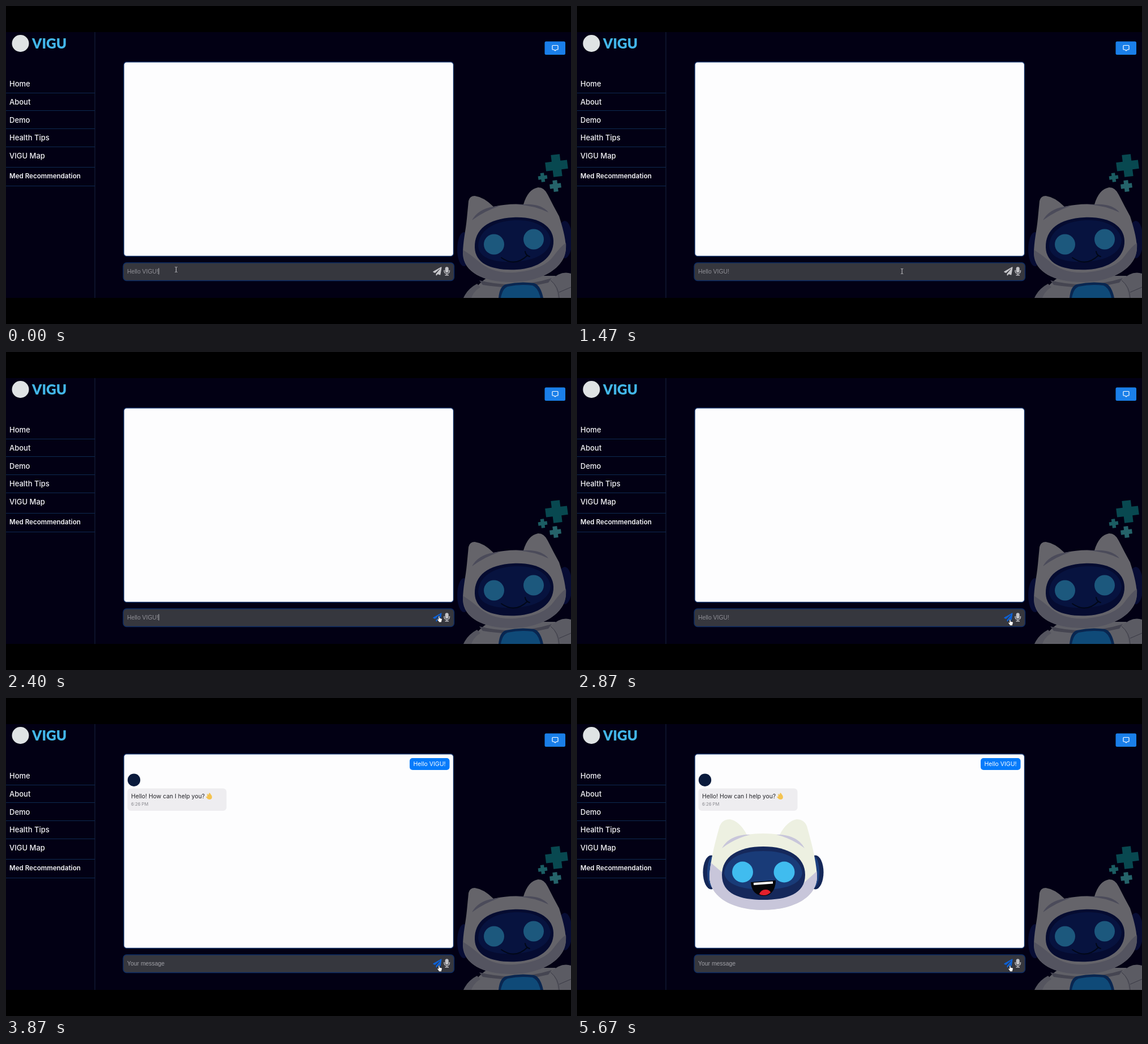
An HTML page that plays this animation: 998 px wide and 561 px high, repeating every 5740 ms.

```html
<!DOCTYPE html>
<html lang="en">
<head>
<meta charset="utf-8">
<title>Chat demo</title>
<style>
  html, body { margin: 0; height: 100%; overflow: hidden; background: #000; }
  svg { display: block; width: 998px; height: 561px; }
  text { font-family: Inter, sans-serif; }
  .nav text { font-size: 13px; font-weight: 500; fill: #f4f4f6; }
  .nav path { stroke: #0d2a50; fill: none; }
  .input text { font: 10.4px "Liberation Sans", Arial, sans-serif; fill: #909097; }
</style>
</head>
<body>
<svg viewBox="0 0 998 561">
  <defs>
    <path id="plus" d="M-.2-.5H.2V-.2H.5V.2H.2V.5H-.2V.2H-.5V-.2H-.2Z"/>
    <clipPath id="page"><path d="M0 46H998V515H0Z"/></clipPath>
    <clipPath id="helmet"><use href="#helmetShape"/></clipPath>
  </defs>

  <path d="M0 46H998V515H0Z" fill="#020014"/>

  <!-- Dimmed mascot -->
  <g clip-path="url(#page)">
    <g fill="#084850">
      <use href="#plus" transform="translate(972.5 281.5) rotate(-7) scale(39)"/>
      <use href="#plus" transform="translate(948 302.500) rotate(-8) scale(16)" fill="#1b5d63"/>
      <use href="#plus" transform="translate(970.5 317.500) rotate(-7) scale(20)" fill="#25636a"/>
    </g>
    <path d="M820 515C826 500 838 485 856 476H970C985 484 994 500 998 515Z" fill="#606067"/>
    <path d="M808 515Q815 499 832 490L838 496Q826 503 822 515Z" fill="#55555f"/>
    <path d="M962 484Q980 466 998 472V515H974Q974 495 962 484Z" fill="#5b5b63"/>
    <path d="M962 484Q976 495 977 515M977 505L998 496" stroke="#393944" fill="none"/>
    <path d="M836 484Q900 500 964 480L958 488Q900 502 842 492Z" fill="#454551"/>
    <path d="M870 515Q872 494 883 491Q908 485 933 489Q944 492 949 515Z" fill="#092650"/>
    <path d="M874 515Q877 498 886 495Q908 490 930 493Q940 497 944 515Z" fill="#0f4a78"/>
    <ellipse cx="809" cy="429" rx="12" ry="30" fill="#070c34"/>
    <ellipse cx="987" cy="412" rx="13" ry="33" fill="#070c34"/>
    <path d="M807 437C807 415 812 397 814 375L817 344Q819 335 828 335Q844 337 861 354Q888 348 914 350Q922 323 940 320Q951 320 957 333Q966 351 977 371C983 390 988 407 989 425C990 462 945 487 893 487C844 487 808 470 807 437Z" fill="#65646a"/>
    <path d="M807 430Q820 438 833 449Q858 473 900 470Q951 465 968 440Q980 424 989 418C993 462 945 487 893 487C842 487 806 470 807 430Z" fill="#545460"/>
    <path d="M823 378Q834 358 861 354L874 352Q846 361 823 378ZM902 350L914 350Q945 348 958 364Q933 352 902 350Z" fill="#4b4b5a"/>
    <path d="M828 426C827 394 852 375 896 373C940 371 966 388 967 414C968 444 940 463 902 465C858 467 829 455 828 426Z" fill="#050b30"/>
    <path d="M834 423C835 397 860 380 897 378C935 376 959 391 962 413C961 437 932 449 900 451C862 453 835 445 834 423Z" fill="#07133f"/>
    <g fill="#1c587d"><circle cx="862" cy="420.500" r="18"/><circle cx="932" cy="411.500" r="18"/></g>
    <path d="M875 444Q899 461 921 440M917 433Q918 440 925 442" fill="none" stroke="#010718" stroke-width="2" stroke-linecap="round"/>
  </g>

  <!-- Sidebar -->
  <circle cx="25.500" cy="66" r="15" fill="#dfe3e4"/>
  <text x="46" y="75" style="font:900 24.5px Lato,sans-serif" fill="#43b7e9">VIGU</text>
  <g class="nav">
    <path d="M157 46V515" style="stroke:#172440"/>
    <path d="M0 153.500H157M0 184.500H157M0 216.500H157M0 248.500H157M0 284.500H157M0 317.500H157"/>
    <text x="6" y="142">Home</text>
    <text x="6" y="174">About</text>
    <text x="6" y="205.500">Demo</text>
    <text x="6" y="237.300">Health Tips</text>
    <text x="6" y="269">VIGU Map</text>
    <text x="6" y="304" style="font-size:11.6px;font-weight:600">Med Recommendation</text>
  </g>

  <rect x="951.500" y="62.500" width="36.500" height="23.500" rx="2.500" fill="#1a7fe9"/>
  <path d="M966 69.500H974Q975 69.500 975 70.500V76Q975 77 974 77H972L970 79L968 77H966Q965 77 965 76V70.500Q965 69.500 966 69.500Z" fill="none" stroke="#fff" stroke-width="1.200"/>

  <!-- Conversation -->
  <rect x="208" y="98.700" width="582.500" height="342.800" rx="5" fill="#fdfdfe" stroke="#0b2a60" stroke-width="1.400"/>
  <g id="sent">
    <rect x="713" y="106" width="70.500" height="21" rx="5" fill="#067bfb"/>
    <text x="719.500" y="120.300" font-size="10.500" fill="#fff">Hello VIGU!</text>
  </g>
  <g id="reply">
    <circle cx="226" cy="144.700" r="11.200" fill="#0a1a3c"/>
    <rect x="214.500" y="159.500" width="175" height="39.500" rx="6" fill="#eeedf0"/>
    <text x="221" y="177" font-size="10.400" fill="#25252a">Hello! How can I help you?</text>
    <path d="M355.500 168.500L358 171L358.500 167.800Q360 167 361 169L363.500 172.500Q365 178 360.500 179Q357 179.500 354.500 176.500L353 174L355.500 174Z" fill="#f4c350"/>
    <text x="221" y="190.300" font-size="7.700" fill="#88888e">6:26 PM</text>
  </g>
  <g id="sticker">
    <g fill="#142758"><ellipse cx="237" cy="307.500" rx="14.500" ry="30"/><ellipse cx="421" cy="307.500" rx="14.500" ry="30"/></g>
    <g fill="#1c4080"><ellipse cx="240" cy="307" rx="10" ry="28"/><ellipse cx="418" cy="307" rx="10" ry="28"/></g>
    <path id="helmetShape" d="M234 313C236 283 246 247 252 226Q257 214 270 214Q287 217 300 241Q329 237 358 241Q371 217 388 214Q401 214 406 226C412 247 422 283 424 313C425 352 382 374 329 374C276 374 233 352 234 313Z" fill="#edf0e1"/>
    <g fill="#c8c6da">
      <path clip-path="url(#helmet)" d="M230 285L258 309Q270 352 329 356Q382 355 402 325L430 300V380H230Z"/>
      <path d="M256 265Q268 243 300 241L306 241Q278 248 256 265ZM402 265Q390 243 358 241L352 241Q380 248 402 265Z"/>
    </g>
    <path d="M256 312C256 280 285 262 329 262C373 262 403 280 403 312C403 346 370 356 329 356C288 356 256 346 256 312Z" fill="#15285b"/>
    <path d="M260 309C263 283 289 270 329 270C369 270 395 283 398 309C395 329 367 338 329 338C291 338 263 329 260 309Z" fill="#193b78"/>
    <g fill="#40bcef"><circle cx="292.500" cy="307" r="18.500"/><circle cx="366" cy="307" r="18.500"/></g>
    <path d="M307 325L351 321.500C351 339 342 349 330 349C316 349 308 340 307 325Z" fill="#05060a"/>
    <path d="M312 328L346 325.500" stroke="#fff" stroke-width="4"/>
    <path d="M322 346Q325 338 333 338Q340 338 342 343Q337 348 330 348Q325 348 322 346Z" fill="#e3202c"/>
  </g>

  <!-- Message field -->
  <rect x="207" y="453" width="584.500" height="31.500" rx="6" fill="#36373e" stroke="#0c2c66" stroke-width="1.400"/>
  <g class="input">
    <text id="typed" x="214" y="472">Hello VIGU!</text>
    <text id="hint" x="214" y="472" style="fill:#a0a0a6">Your message</text>
  </g>
  <path id="caret" d="M269.800 462.500V473.500" stroke="#c4c4c8"/>
  <path id="plane" transform="translate(754.3 460.300) scale(.0297)" d="M476 3L12 271C-6 281-3 306 15 314L121 358L408 105C414 100 422 108 417 114L176 407V488C176 511 204 520 218 503L282 426L407 478C421 484 437 475 440 460L512 28C515 8 493-7 476 3Z"/>
  <g stroke="#c3c3c7" fill="none" stroke-width="1.400">
    <path d="M774 466V468Q774.500 472 778.700 472Q783 472 783.400 468V466M778.700 472V474.800M775.500 474.800H782"/>
    <rect x="775.700" y="460.300" width="6" height="10" rx="3" fill="#c3c3c7" stroke="none"/>
  </g>

  <path id="beam" d="M-2-4.500Q0-4.500 0-3.500V3.500Q0 4.500-2 4.500M2-4.500Q0-4.500 0-3.500M0 3.500Q0 4.500 2 4.500" fill="none" stroke="#c9c9cd"/>
  <path id="hand" d="M-2.200-5Q-1-6.200 0-5V-1.800L3-1.200Q4.500-.8 4.400 .8L3.500 4V5.800H-1.800V4.300L-4.400 1Q-4.600-.6-3.200-.2L-2.200 .8Z" fill="#fff" stroke="#15151a" stroke-width=".8"/>
</svg>
<script>
  const LOOP = 5740, STEP = 200 / 3;
  const el = id => document.getElementById(id);
  const show = (id, on) => el(id).style.display = on ? "" : "none";
  const place = (id, x, y) => el(id).setAttribute("transform", `translate(${x} ${y})`);
  const mix = (a, b, k) => a + (b - a) * k;
  const ease = (t, from, to) => {
    const k = Math.min(1, Math.max(0, (t - from) / (to - from)));
    return (1 - Math.cos(Math.PI * k)) / 2;
  };

  function draw(now) {
    const t = Math.floor((now % LOOP + 4) / STEP) * STEP + 4;
    const sent = t >= 3395, hover = t >= 1860;

    const across = ease(t, 870, 1950);
    const x = mix(300.5, 766, across);
    const y = mix(465, 468, Math.min(1, across * 1.7)) + 9 * ease(t, 2070, 2900);
    place("beam", x, y);
    place("hand", x, y);
    show("beam", !hover);
    show("hand", hover);

    el("plane").setAttribute("fill", hover ? "#0d61d6" : "#c6c6ca");
    show("caret", !sent && (t + 130) % 1066 < 533);
    show("typed", !sent);
    show("hint", sent);
    show("sent", sent);
    show("reply", t >= 3865);
    show("sticker", t >= 4125);
  }

  const start = performance.now();
  (function tick() {
    draw(performance.now() - start);
    requestAnimationFrame(tick);
  })();
</script>
</body>
</html>
```
